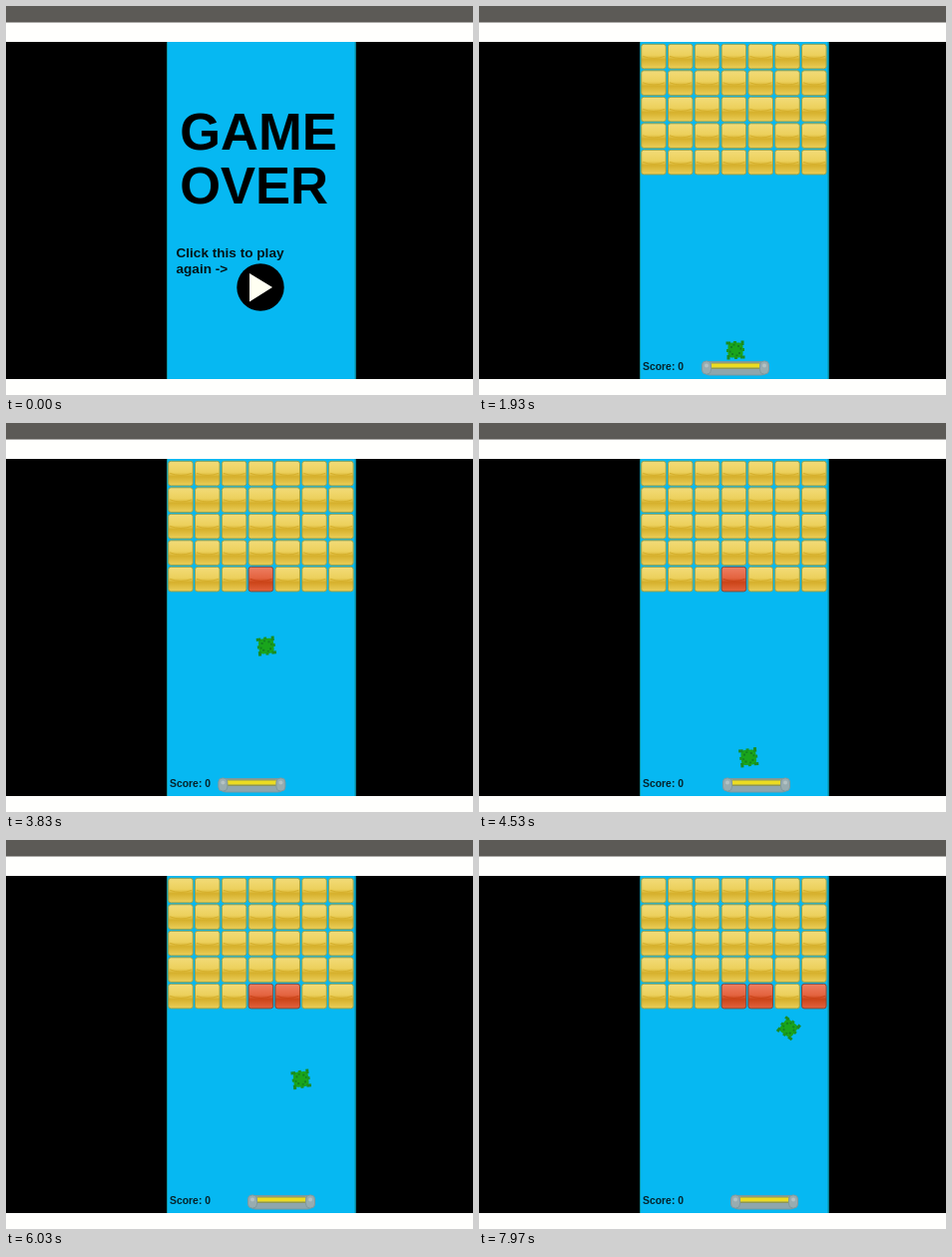
Animation, 468 px wide and 390 px high, one loop 8000 ms. Source, as an HTML page with a canvas:

```html
<!DOCTYPE html>
<html lang="en">
<head>
<meta charset="utf-8">
<title>Brick game</title>
<style>
  html, body { margin: 0; width: 100%; height: 100%; overflow: hidden; background: #fffffd; }
  canvas { display: block; }
</style>
</head>
<body>
<canvas id="stage" width="468" height="390"></canvas>
<script>
const ctx = document.getElementById('stage').getContext('2d');
const LOOP = 8000;
const GAME_START = 1200;
const LAUNCH = 2500;
const BALL_SPEED = 0.16; // px per ms
const FONT = '"Liberation Sans", Arial, sans-serif';
const FIELD = { x: 161, y: 36, w: 189.5, h: 338 };
const BRICK = { x: 162.2, y: 37.8, stepX: 26.8, stepY: 26.5, size: 25.6 };

// The ball flies straight between these points at constant speed
const bounces = [
  [257, 345], [257, 178], [271, 345], [289, 178],
  [307, 345], [341, 262], [324, 171], [304, 197]
];

let clock = LAUNCH;
const flights = bounces.slice(1).map(([x, y], i) => {
  const [fromX, fromY] = bounces[i];
  const dx = x - fromX, dy = y - fromY;
  const flight = { fromX, fromY, x, y, dx, dy, begin: clock };
  clock += Math.hypot(dx, dy) / BALL_SPEED;
  return { ...flight, end: clock };
});

const hits = flights.filter(f => f.y < 180).map(f => ({
  time: f.end,
  col: Math.round((f.x - 176) / BRICK.stepX)
}));

// [time, centre x], eased from one hand movement to the next
const paddleMoves = [
  [2560, 257], [2700, 264], [3360, 209], [4250, 278], [4530, 278],
  [5000, 286], [6030, 276], [6650, 316.5], [7200, 316.5], [7970, 286]
];

const clamp = k => Math.min(1, Math.max(0, k));
const ease = k => k * k * (3 - 2 * k);

function paddleX(t) {
  return paddleMoves.reduce((x, [time, goal], i) => {
    const begin = i ? paddleMoves[i - 1][0] : 0;
    return x + (goal - x) * ease(clamp((t - begin) / (time - begin)));
  }, 257);
}

function rect(x, y, w, h, color) {
  ctx.fillStyle = color;
  ctx.fillRect(x, y, w, h);
}

function rounded(x, y, w, h, r, fill, stroke) {
  ctx.beginPath();
  ctx.roundRect(x, y, w, h, r);
  ctx.fillStyle = fill;
  ctx.fill();
  if (stroke) {
    ctx.strokeStyle = stroke;
    ctx.lineWidth = 1;
    ctx.stroke();
  }
}

function circle(x, y, r, color) {
  ctx.beginPath();
  ctx.arc(x, y, r, 0, Math.PI * 2);
  ctx.fillStyle = color;
  ctx.fill();
}

function text(str, x, y, size, color = '#041418') {
  ctx.font = `bold ${size}px ${FONT}`;
  ctx.fillStyle = color;
  ctx.fillText(str, x, y);
}

function drawPage() {
  rect(0, 0, 468, 390, '#fffffd');
  rect(0, 0, 468, 16.5, '#5c5a56');
  rect(0, FIELD.y, 468, FIELD.h, '#000');
  rect(FIELD.x, FIELD.y, FIELD.w, FIELD.h, '#06b8f2');
  for (const x of [FIELD.x, FIELD.x + FIELD.w - 1]) rect(x, FIELD.y, 1, FIELD.h, '#0c8f9c');
}

function drawGameOver() {
  text('GAME', 174.2, 143.5, 52.5, '#000');
  text('OVER', 174.2, 198, 52.5, '#000');
  text('Click this to play', 170.5, 252, 13.6);
  text('again ->', 170.5, 268, 13.6);
  circle(255, 282, 23.7, '#000');
  ctx.beginPath();
  ctx.moveTo(244, 268);
  ctx.lineTo(267, 282);
  ctx.lineTo(244, 296.5);
  ctx.fillStyle = '#fffff2';
  ctx.fill();
}

function drawBrick(col, row, hit) {
  const x = BRICK.x + col * BRICK.stepX, y = BRICK.y + row * BRICK.stepY;
  const [light, mid, dark, edge] = hit
    ? ['#ee8064', '#e46440', '#cb4418', '#7a4a3c']
    : ['#f3dc7a', '#ecd05c', '#d6b02c', '#8fa050'];
  const shade = ctx.createLinearGradient(0, y, 0, y + BRICK.size);
  shade.addColorStop(0, light);
  shade.addColorStop(0.45, mid);
  shade.addColorStop(0.62, dark);
  shade.addColorStop(1, mid);
  rounded(x + 0.5, y + 0.5, BRICK.size - 1, BRICK.size - 1, 2.5, shade, edge);
  ctx.beginPath();
  ctx.moveTo(x + 2, y + 12.5);
  ctx.quadraticCurveTo(x + 13, y + 17, x + 24, y + 12.5);
  ctx.strokeStyle = dark;
  ctx.stroke();
}

function drawPaddle(x) {
  ctx.save();
  ctx.translate(x, 362.5);
  rounded(-32.5, -6, 65, 13.5, 6.5, '#8fa6ac', '#7a999f');
  rounded(-25.5, -5, 51, 6.5, 2, '#8c9658');
  rect(-24.5, -4, 49, 4, '#ecdc22');
  for (const side of [-29, 29]) {
    rounded(side - 4.5, -6.5, 9, 13, 4, '#98acb0', '#7f999e');
    circle(side, -2, 2, '#b4c2c4');
  }
  ctx.restore();
}

function drawBall(t) {
  const f = flights.find(f => t < f.end) ?? flights.at(-1);
  const k = clamp((t - f.begin) / (f.end - f.begin));
  ctx.save();
  ctx.translate(f.fromX + f.dx * k, f.fromY + f.dy * k);
  ctx.rotate(Math.atan2(f.dy, f.dx));
  rounded(-7.5, -7.5, 15, 15, 4, '#1aa51c');
  for (let i = 0; i < 4; i++) {
    ctx.rotate(Math.PI / 2);
    rect(5, 5.5, 4.5, 3, '#1a8c20');
    rect(6.5, -2, 2.5, 3, '#1a9420');
    rect(3, 2, 2, 2, '#128020');
    rect(4.5, -2.5, 1.5, 2, '#128020');
  }
  ctx.restore();
}

function drawGame(t) {
  for (let row = 0; row < 5; row++) {
    for (let col = 0; col < 7; col++) {
      drawBrick(col, row, row === 4 && hits.some(h => h.col === col && t >= h.time));
    }
  }
  drawPaddle(paddleX(t));
  drawBall(t);
  text('Score: 0', 164, 365, 10.4, '#06232b');
}

let start;
function frame(now) {
  start ??= now;
  const t = (now - start) % LOOP;
  drawPage();
  if (t < GAME_START) drawGameOver();
  else drawGame(t);
  requestAnimationFrame(frame);
}
requestAnimationFrame(frame);
</script>
</body>
</html>
```
